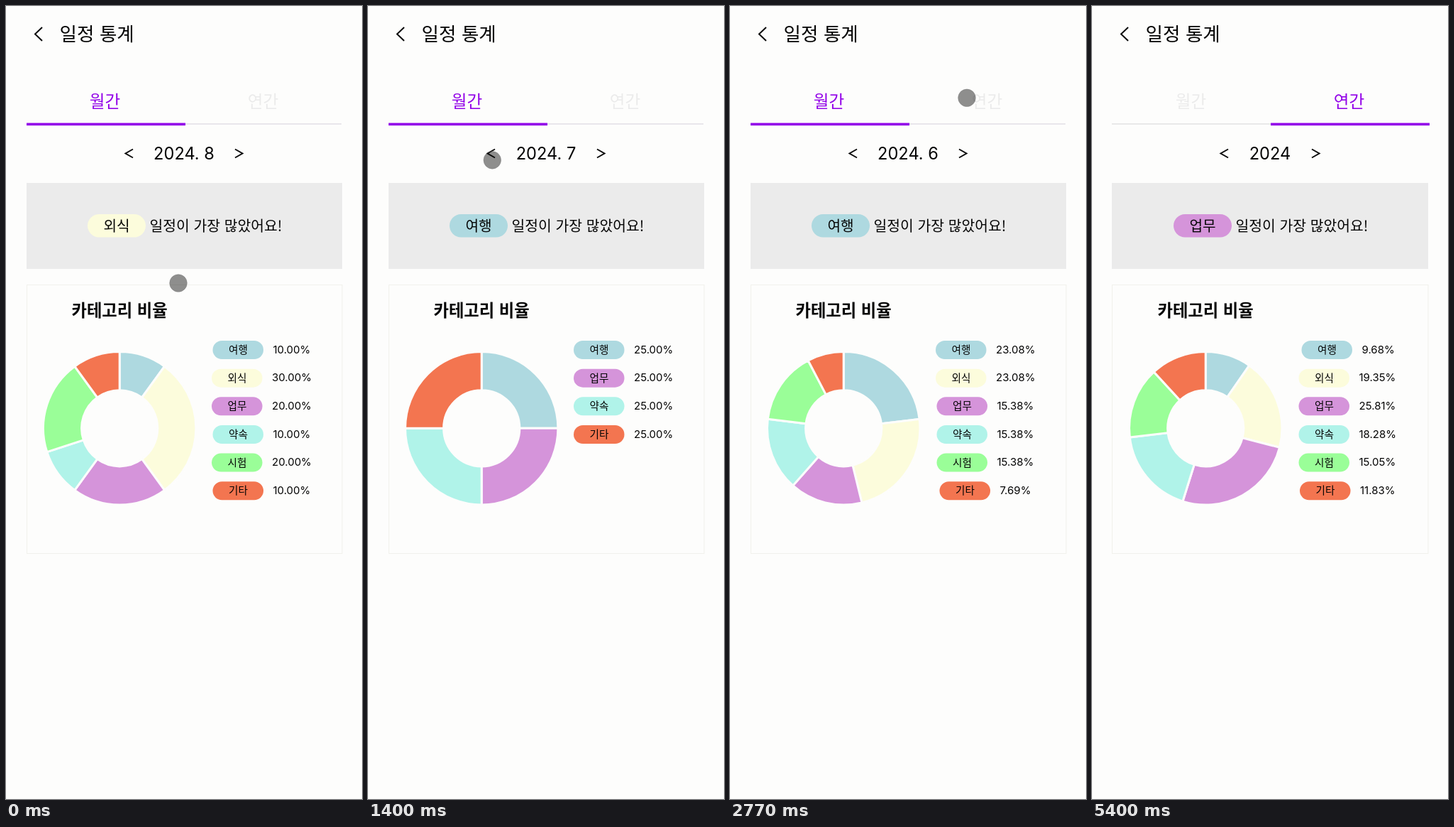
These frames come from a looping animation (502x1116 px, 5.43 s). An HTML page:

```html
<!DOCTYPE html>
<html lang="ko">
<head>
<meta charset="utf-8">
<title>일정 통계</title>
<style>
html, body { margin: 0; width: 100%; height: 100%; overflow: hidden; background: #fdfdfc; }
svg { display: block; width: 100%; height: 100%; }
text { font-family: "Noto Sans CJK KR", "Noto Sans CJK", sans-serif; font-weight: 500; fill: #050505; }
.num { font-family: Inter, "Noto Sans", sans-serif; font-weight: 400; }
.mid { text-anchor: middle; }
.line { fill: none; stroke: #0a0a0a; stroke-width: 2; }
</style>
</head>
<body>
<svg id="stage" viewBox="0 0 502 1116" xmlns="http://www.w3.org/2000/svg"></svg>
<script>
const LOOP = 5430;
const JULY = 453, JUNE = 1738, YEAR = 3480, MORPH = 632;
const GAP = 3, CX = 160.2, CY = 594.3, OUTER = 107.7, INNER = 53.6;
const PAPER = '#fdfdfc';

const COLORS = {
  여행: [174, 217, 224], 외식: [252, 252, 220], 업무: [213, 148, 218],
  약속: [176, 243, 233], 시험: [154, 254, 152], 기타: [243, 117, 80]
};
const ALL = Object.keys(COLORS);

const view = (label, top, names, shares, yearly) => ({ label, top, names, shares, yearly });
const AUG = view('2024. 8', '외식', ALL, [10, 30, 20, 10, 20, 10]);
const JUL = view('2024. 7', '여행', ['여행', '업무', '약속', '기타'], [25, 25, 25, 25]);
const JUN = view('2024. 6', '여행', ALL, [23.08, 23.08, 15.38, 15.38, 15.38, 7.69]);
const ALLYEAR = view('2024', '업무', ALL, [9.68, 19.35, 25.81, 18.28, 15.05, 11.83], true);

// Pointer stops: time, x, y
const PATH = [[0, 243, 390], [400, 177.5, 216], [1250, 177.5, 216], [1600, 171.5, 218.3],
  [2050, 171.5, 218.3], [2680, 334, 129.3], [YEAR, 334, 129.3]];

const stage = document.getElementById('stage');
const rgb = c => `rgb(${c.map(Math.round).join()})`;
const mix = (a, b, k) => a + (b - a) * k;
const clamp = v => Math.min(1, Math.max(0, v));
const ease = p => p < 0.5 ? 2 * p * p : 1 - 2 * (1 - p) * (1 - p);

const text = (s, x, y, size, extra = '') =>
  `<text x="${x}" y="${y}" font-size="${size}" ${extra}>${s}</text>`;
const rect = (x, y, w, h, fill, extra = '') =>
  `<rect x="${x}" y="${y}" width="${w}" height="${h}" fill="${fill}" ${extra}/>`;
const chevron = (tip, y, dx, dy) =>
  `<path class="line" d="M${tip + dx} ${y - dy}L${tip} ${y}L${tip + dx} ${y + dy}"/>`;

function slices(v) {
  const sum = v.shares.reduce((a, b) => a + b, 0);
  let at = 0;
  return v.shares.map((share, i) => {
    const start = at;
    at += share / sum * 360;
    return { start, end: at, color: COLORS[v.names[i]] };
  });
}

function point(r, deg) {
  const a = deg * Math.PI / 180;
  return `${(CX + r * Math.sin(a)).toFixed(2)} ${(CY - r * Math.cos(a)).toFixed(2)}`;
}

function slicePath({ start, end, color }) {
  const big = end - start > 180 ? 1 : 0;
  const d = `M${point(OUTER, start)}A${OUTER} ${OUTER} 0 ${big} 1 ${point(OUTER, end)}` +
    `L${point(INNER, end)}A${INNER} ${INNER} 0 ${big} 0 ${point(INNER, start)}Z`;
  return `<path d="${d}" fill="${rgb(color)}" stroke="${PAPER}" stroke-width="${GAP}"/>`;
}

// Slices pair up by index; a new one opens from the zero angle.
function pie(from, to, k) {
  const old = slices(from);
  return slices(to).map((s, i) => {
    const o = old[i] || { start: 0, end: 0, color: s.color };
    return slicePath({
      start: mix(o.start, s.start, k),
      end: mix(o.end, s.end, k),
      color: s.color.map((c, j) => mix(o.color[j], c, k))
    });
  }).join('');
}

function legend(v) {
  return v.names.map((name, i) => {
    const pct = v.shares[i].toFixed(2) + '%';
    const x = 290 + 1.5 * (pct.split('1').length - 1) + (pct.length < 6 ? 5.5 : 0);
    const y = 471 + 39.65 * i;
    return rect(x, y, 71.5, 26, rgb(COLORS[name]), 'rx="13"') +
      text(name, x + 36, y + 18, 14.6, 'class="mid"') +
      text(pct, x + 85, y + 17.8, 15, 'class="num"');
  }).join('');
}

function tabs(yearly) {
  const on = '#9200e8', off = '#ebebeb';
  const label = (s, x, active) =>
    text(s, x, 143.3, 23.6, `class="mid" style="fill:${active ? on : off}"`);
  return label('월간', 139.5, !yearly) + label('연간', 362.5, yearly) +
    (yearly ? rect(28, 165, 224, 2, '#e9e9e9') + rect(252, 164.6, 224, 3.6, on)
            : rect(253, 165, 220, 2, '#e9e6eb') + rect(29, 164.6, 224, 3.6, on));
}

function screen(v) {
  const left = v.yearly ? 28 : 29, side = v.yearly ? 69.5 : 82.5;
  return rect(0, 0, 502, 1116, PAPER) +
    chevron(41, 39.5, 10, 9.5) +
    text('일정 통계', 75.5, 49.3, 26.6) +
    tabs(v.yearly) +
    chevron(251 - side, 207.5, 10.5, 6) + chevron(251 + side, 207.5, -10.5, 6) +
    text(v.label, 251, 216, 23.6, 'class="num mid"') +
    rect(left, 249, 474 - left, 121, '#ebebeb') +
    rect(115, 293, 82, 32.5, rgb(COLORS[v.top]), 'rx="16.25"') +
    text(v.top, 156, 317, 20.2, 'class="mid"') +
    text('일정이 가장 많았어요!', 202.5, 317, 20.4) +
    rect(left + 0.5, 392.5, 473.5 - left, 378, 'none', 'stroke="#f1f1ec"') +
    text('카테고리 비율', 92.5, 436.5, 23.3, 'style="font-weight:900"') +
    legend(v);
}

function pointer(t) {
  if (t >= YEAR) return '';
  const i = PATH.findIndex(p => p[0] > t);
  const [t0, x0, y0] = PATH[i - 1], [t1, x1, y1] = PATH[i];
  const k = ease((t - t0) / (t1 - t0));
  return `<circle cx="${mix(x0, x1, k)}" cy="${mix(y0, y1, k)}" r="12.3" ` +
    'fill="#000" fill-opacity=".44" stroke="#777" stroke-opacity=".45"/>';
}

function draw(t) {
  let from = AUG, to = AUG, began = 0;
  if (t >= YEAR) from = to = ALLYEAR;
  else if (t >= JUNE) [from, to, began] = [JUL, JUN, JUNE];
  else if (t >= JULY) [from, to, began] = [AUG, JUL, JULY];
  const k = ease(clamp((t - began) / MORPH));
  stage.innerHTML = screen(to) + pie(from, to, k) + pointer(t);
}

const origin = performance.now();
function tick() {
  draw((performance.now() - origin) % LOOP);
  requestAnimationFrame(tick);
}
tick();
</script>
</body>
</html>
```
